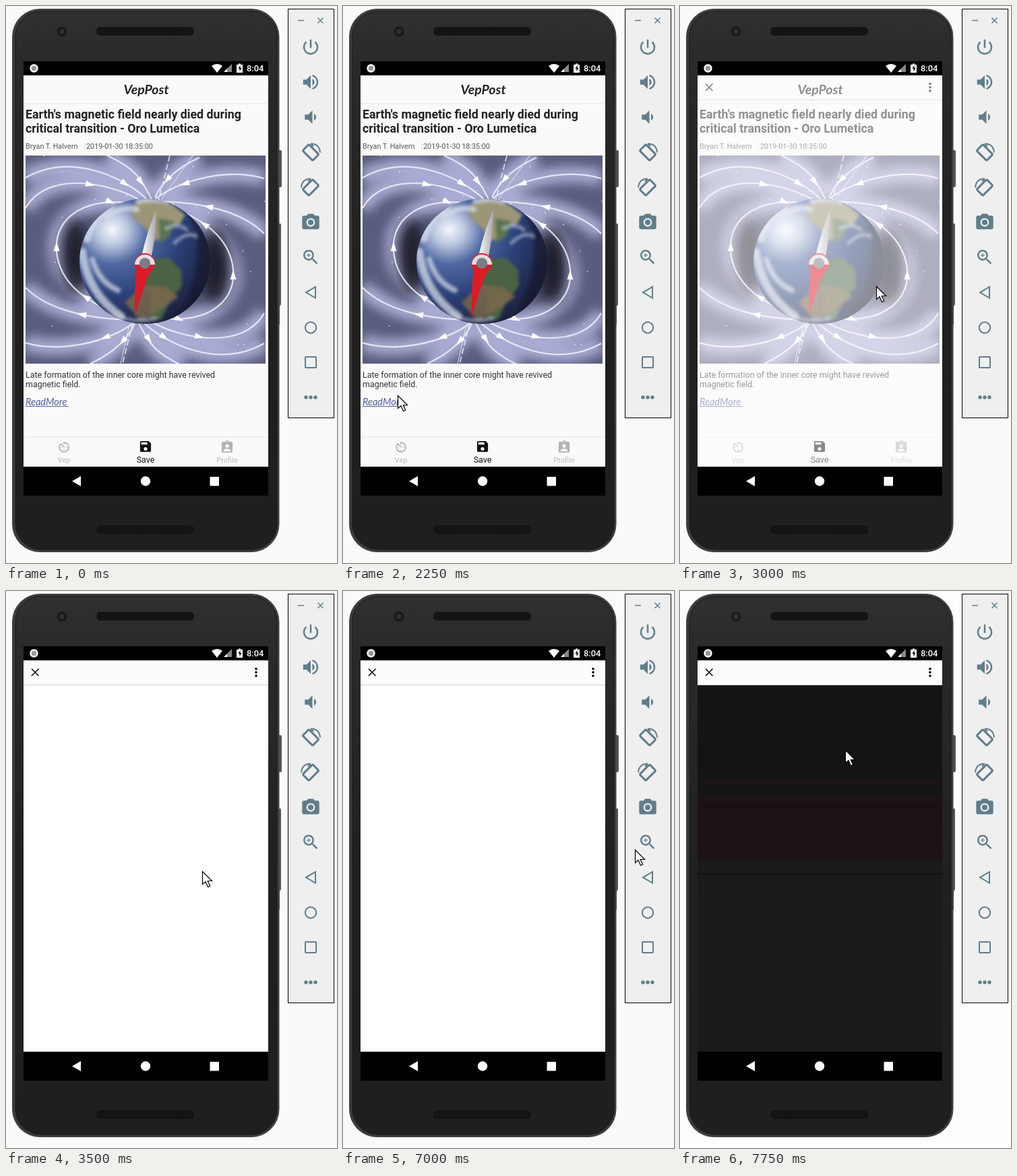
An HTML page for the animation above (8000 ms loop, 491x827 px).

```html
<!DOCTYPE html>
<html lang="en">
<head>
<meta charset="utf-8">
<title>News reader in a phone emulator</title>
<style>
  html, body { margin: 0; width: 100%; height: 100%; overflow: hidden; background: #fafafa; }
  svg { display: block; width: 491px; height: 827px; font-family: Roboto, sans-serif; }
  .script { font-family: Lato, sans-serif; font-style: italic; }
  .mid { text-anchor: middle; }
</style>
</head>
<body>
<svg viewBox="0 0 491 827">
  <defs>
    <linearGradient id="face" x2="0" y2="1">
      <stop stop-color="#303030"/><stop offset=".1" stop-color="#2a2a2a"/>
      <stop offset=".5" stop-color="#202020"/><stop offset="1" stop-color="#1f1f1f"/>
    </linearGradient>
    <radialGradient id="ocean" cx=".25" cy=".25" r=".85">
      <stop stop-color="#f4f7fc"/><stop offset=".14" stop-color="#bcc7e0"/>
      <stop offset=".32" stop-color="#5068a2"/><stop offset=".62" stop-color="#2b4078"/>
      <stop offset="1" stop-color="#1a1f38"/>
    </radialGradient>
    <linearGradient id="steel"><stop stop-color="#fff"/><stop offset="1" stop-color="#a5a5ab"/></linearGradient>
    <pattern id="mesh" width="4" height="4" patternUnits="userSpaceOnUse">
      <rect width="4" height="4" fill="#1c1c1c"/><path d="M0 0h2v2h-2zM2 2h2v2h-2z" fill="#0c0c0c"/>
    </pattern>
    <filter id="blur" x="-50%" y="-50%" width="200%" height="200%"><feGaussianBlur stdDeviation="11"/></filter>
    <filter id="glow"><feGaussianBlur stdDeviation="8"/></filter>
    <filter id="soft"><feGaussianBlur stdDeviation="2.2"/></filter>
    <clipPath id="photo"><path d="M29 222h356v309H29z"/></clipPath>
    <clipPath id="globe"><ellipse cx="206" cy="379" rx="97" ry="93"/></clipPath>
  </defs>

  <rect id="backdrop" width="491" height="827" fill="#fafafa"/>

  <!-- phone body -->
  <path d="M403 214h4q2 0 2 2v51q0 2-2 2h-4zM403 323h4q1 0 1 2v118l-2 3v27h-3z" fill="#555"/>
  <rect x="9.5" y="4.5" width="395.500" height="806" rx="41" fill="#3b3b3b" stroke="#454545"/>
  <rect x="14" y="8" width="388" height="799" rx="38" fill="url(#face)" stroke="#181818"/>
  <circle cx="83" cy="38" r="7.500" fill="#1b1b1b"/>
  <circle cx="83" cy="38" r="3.500" fill="#303034"/>
  <rect x="134" y="31" width="145" height="13" rx="6" fill="url(#mesh)"/>
  <rect x="134" y="771" width="145" height="13" rx="6" fill="url(#mesh)"/>
  <path d="M26 82h363v645H26z"/>

  <!-- status and navigation bars -->
  <g fill="#fff">
    <circle cx="41.500" cy="92.500" r="5" fill="#999" stroke="#fff" stroke-width="2.400"/>
    <path d="M305 89q8-6 16 0l-8 10z"/>
    <path d="M335 86v12h-7v-5z" fill="#888"/><path d="M328 93v5h-5z"/>
    <path d="M342 87h3v-1.500h3v1.500h3v12h-9z"/>
    <path d="M347.500 88l-3 5h2v4l3-5h-2z" fill="#000"/>
    <text x="357" y="97" font-size="12.900" font-weight="500">8:04</text>
    <path d="M98 705.500l13-7.500v15z"/><circle cx="207" cy="705.500" r="7.200"/>
    <rect x="302.500" y="699" width="13.500" height="13.500" rx="1"/>
  </g>

  <!-- article -->
  <g id="article">
    <path d="M26 103h363v581H26z" fill="#fafafa"/>
    <path d="M26 145h363M26 640h363" stroke="#e4e4e4"/>
    <text class="script mid" x="208" y="131" font-size="19.500" font-weight="700" fill="#222">VepPost</text>
    <g font-size="17.800" font-weight="700" fill="#222">
      <text x="29" y="167">Earth's magnetic field nearly died during</text>
      <text x="29" y="188">critical transition - Oro Lumetica</text>
    </g>
    <g font-size="10.800" fill="#555">
      <text x="29" y="212">Bryan T. Halvern</text>
      <path d="M116.500 203v10" stroke="#ddd"/>
      <text x="119" y="212">2019-01-30 18:35:00</text>
    </g>

    <g clip-path="url(#photo)">
      <path d="M29 222h356v309H29z" fill="#5a5c7e"/>
      <g fill="none" stroke="#a9abd2" stroke-width="24" filter="url(#glow)">
        <use href="#field"/><use href="#field" transform="rotate(180 206 378)"/>
      </g>
      <g fill="#1c1c2b" filter="url(#blur)">
        <ellipse cx="103" cy="372" rx="20" ry="58"/><ellipse cx="310" cy="386" rx="22" ry="58"/>
      </g>
      <g id="stars"></g>
      <g fill="none" stroke="#eceef8" stroke-width="2.200" opacity=".9">
        <path id="field" d="M195 295C125 280 70 310 75 365C80 415 125 445 185 463M200 289C150 260 60 245 29 300M210 288C180 258 100 215 29 255M216 287C200 255 190 240 150 222M29 418C60 450 120 465 188 466M29 500C80 515 150 500 190 470M125 531C160 515 180 495 191 472"/>
        <use href="#field" transform="rotate(180 206 378)"/>
        <path d="M243 222L226 290M188 470L173 531" stroke-dasharray="9 4" stroke-width="1.600"/>
        <path d="M277 222L230 288M184 470L170 531" stroke-width="1"/>
      </g>
      <g id="arrows" fill="#fff"></g>
      <ellipse cx="206" cy="379" rx="97" ry="93" fill="url(#ocean)"/>
      <g clip-path="url(#globe)"><g filter="url(#soft)">
        <path d="M186 296l22-9 38 7 20 16-8 14-19 2-8 18-14 6-10-20-18-14z" fill="#9b9677"/>
        <path d="M226 315l24 5-8 22-14 10z" fill="#5c7352"/>
        <path d="M218 376l24-2 18 18 1 24-18 22-13 28-17-4 2-34-14-22z" fill="#4b6245"/>
        <path d="M176 440l28-26 34 4 18 14-26 18-30 18z" fill="#7d6a4c" opacity=".8"/>
        <g fill="none" stroke="#dfe4ef" stroke-linecap="round">
          <path d="M113 365q8 62 58 96M120 345q6-30 34-48" stroke-width="12" opacity=".7"/>
          <path d="M128 376q10 34 38 46M150 312q22-16 44-10M196 290q20-6 42 0" stroke-width="8" opacity=".65"/>
          <path d="M250 352q18-18 32-10M160 458q30 14 62 6M238 330q18-8 30 2" stroke-width="5" opacity=".5"/>
        </g>
        <path d="M268 300q38 70-14 165h60v-170z" fill="#14182b" opacity=".55"/>
      </g></g>
      <path d="M223 302Q206 345 201 373L215 375Q222 345 223 302Z" fill="url(#steel)"/>
      <path d="M191 462Q190 420 194 388L216 390Q202 420 191 462Z" fill="#dc1b26"/>
      <g fill="none" stroke-width="7">
        <circle cx="206" cy="382" r="11.500" stroke="#dc1b26"/>
        <path d="M194.500 384a11.500 11.500 0 0 1 23 0" stroke="#dedee2"/>
      </g>
      <circle cx="206" cy="382" r="8" fill="#7a7d84"/>
    </g>

    <g font-size="12.450" fill="#333">
      <text x="29" y="552">Late formation of the inner core might have revived</text>
      <text x="29" y="566">magnetic field.</text>
    </g>
    <text class="script" x="29" y="593" font-size="14.500" fill="#5361a3">ReadMore</text>
    <path d="M29 594.500h63.500" stroke="#5361a3"/>
    <g class="mid" font-size="11" fill="#bbb">
      <text x="86" y="678">Vep</text>
      <text x="207" y="678" font-size="12.500" fill="#111">Save</text>
      <text x="328" y="678">Profile</text>
    </g>
    <g id="tabs"></g>
  </g>

  <!-- in-app browser -->
  <g id="browser">
    <path id="page" d="M26 103h363v581H26z" fill="#fff"/>
    <g id="dark">
      <path d="M26 140h363v544H26z" fill="#1b1a1b"/>
      <path d="M26 140h363v140H26z" fill="#141414"/>
      <path d="M26 280h363v121H26z" fill="#1c1414"/>
      <path d="M26 286h363v16H26z" fill="#151313"/>
      <path d="M26 321h363M26 420h363" stroke="#171112" stroke-width="2"/>
    </g>
    <path d="M26 103h363v36H26z" fill="#fcfcfc"/>
    <path d="M26 139.500h363" stroke="#cfcfcf"/>
    <path d="M38 115.500l10.500 10.500M48.500 115.500L38 126" stroke="#111" stroke-width="1.700"/>
    <circle cx="371" cy="115.500" r="1.800"/><circle cx="371" cy="120.800" r="1.800"/><circle cx="371" cy="126" r="1.800"/>
    <circle id="spinner" cx="206.500" cy="393" r="15.500" fill="none" stroke="#ddd" stroke-width="3"/>
  </g>

  <!-- emulator toolbar -->
  <rect x="418.500" y="4.500" width="68" height="607" fill="#efefef" stroke="#000"/>
  <g id="tools"></g>
  <g fill="none" stroke="#607d8b" stroke-width="2">
    <path d="M433 21.500h9M462.500 17.500l8 8M470.500 17.500l-8 8" stroke-width="1.500"/>
    <g id="turn">
      <rect x="445.500" y="207" width="13" height="21" rx="2" transform="rotate(-45 452 217.500)" stroke-width="3"/>
      <path d="M452 204.500q13 0 14 13M452 204.500l4 4"/>
    </g>
    <use href="#turn" transform="matrix(-1 0 0 1 904 52)"/>
    <path d="M459 417v16.500l-14-8.200z"/><circle cx="452" cy="477.500" r="8.200"/>
    <rect x="444" y="521" width="16" height="16" rx="1"/>
  </g>
  <g fill="#607d8b"><circle cx="445" cy="581" r="2.700"/><circle cx="452" cy="581" r="2.700"/><circle cx="459" cy="581" r="2.700"/></g>

  <path id="cursor" d="M.5.500v19l4.500-4 3.500 8 3.200-1.500-3.500-7.500h6.300z" fill="#fff" stroke="#000" stroke-width="1.200"/>
</svg>

<script>
const $ = id => document.getElementById(id);

// Icons live on a 24-unit grid, centred on (x, y).
const icon = (x, y, scale, color, d) =>
  `<path transform="translate(${x} ${y}) scale(${scale}) translate(-12 -12)" fill="${color}" d="${d}"/>`;

const slate = '#607d8b';
$('tools').innerHTML =
  icon(452, 61, 1.25, slate, 'M13 3h-2v10h2V3zm4.83 2.17l-1.42 1.42C17.99 7.86 19 9.81 19 12c0 3.87-3.13 7-7 7s-7-3.13-7-7c0-2.19 1.01-4.14 2.58-5.42L6.17 5.17C4.23 6.82 3 9.26 3 12c0 4.97 4.03 9 9 9s9-4.03 9-9c0-2.74-1.23-5.18-3.17-6.83z') +
  icon(452, 113, 1.25, slate, 'M3 9v6h4l5 5V4L7 9H3zm13.5 3c0-1.77-1.02-3.29-2.5-4.03v8.05c1.48-.73 2.5-2.25 2.5-4.02zM14 3.23v2.06c2.89.86 5 3.54 5 6.71s-2.11 5.85-5 6.71v2.06c4.01-.91 7-4.49 7-8.77s-2.99-7.86-7-8.77z') +
  icon(452, 165, 1.25, slate, 'M18.5 12c0-1.77-1.02-3.29-2.5-4.03v8.05c1.48-.73 2.5-2.25 2.5-4.02zM5 9v6h4l5 5V4L9 9H5z') +
  icon(452, 321.3, 1.27, slate, 'M15.2 12a3.2 3.2 0 1 1-6.4 0a3.2 3.2 0 1 1 6.4 0zM9 2L7.17 4H4c-1.1 0-2 .9-2 2v12c0 1.1.9 2 2 2h16c1.1 0 2-.9 2-2V6c0-1.1-.9-2-2-2h-3.17L15 2H9zm3 15c-2.76 0-5-2.24-5-5s2.24-5 5-5 5 2.24 5 5-2.24 5-5 5z') +
  icon(452, 373, 1.22, slate, 'M15.5 14h-.79l-.28-.27C15.41 12.59 16 11.11 16 9.5 16 5.91 13.09 3 9.5 3S3 5.91 3 9.5 5.91 16 9.5 16c1.61 0 3.09-.59 4.23-1.57l.27.28v.79l5 4.99L20.49 19l-4.99-5zm-6 0C7.01 14 5 11.99 5 9.5S7.01 5 9.5 5 14 7.01 14 9.5 11.99 14 9.5 14zM12 10h-2v2H9v-2H7V9h2V7h1v2h2v1z');

$('tabs').innerHTML =
  icon(86, 655, .87, '#b3b3b3', 'M11 17a1 1 0 0 0 2 0a1 1 0 0 0-2 0zm0-14v4h2V5.08c3.39.49 6 3.39 6 6.92 0 3.87-3.13 7-7 7s-7-3.13-7-7c0-1.68.59-3.22 1.58-4.42L12 13l1.41-1.41-6.8-6.8C4.42 6.45 3 9.05 3 12c0 4.97 4.02 9 9 9 4.97 0 9-4.03 9-9s-4.03-9-9-9h-1zm7 9a1 1 0 0 0-2 0a1 1 0 0 0 2 0zM6 12a1 1 0 0 0 2 0a1 1 0 0 0-2 0z') +
  icon(207, 654, .9, '#111', 'M17 3H5c-1.11 0-2 .9-2 2v14c0 1.1.89 2 2 2h14c1.1 0 2-.9 2-2V7l-4-4zm-5 16c-1.66 0-3-1.34-3-3s1.34-3 3-3 3 1.34 3 3-1.34 3-3 3zm3-10H5V5h10v4z') +
  icon(328, 655, .9, '#b3b3b3', 'M19 3h-4.18C14.4 1.84 13.3 1 12 1c-1.3 0-2.4.84-2.82 2H5c-1.1 0-2 .9-2 2v14c0 1.1.9 2 2 2h14c1.1 0 2-.9 2-2V5c0-1.1-.9-2-2-2zm-7 0c.55 0 1 .45 1 1s-.45 1-1 1-1-.45-1-1 .45-1 1-1zm0 4c1.66 0 3 1.34 3 3s-1.34 3-3 3-3-1.34-3-3 1.34-3 3-3zm6 12H6v-1.4c0-2 4-3.1 6-3.1s6 1.1 6 3.1V19z');

// A dipole field points the same way at opposite points, so each arrow has a twin.
const arrow = (x, y, angle) =>
  `<path d="M7 0L-7-4.500V4.500z" transform="translate(${x} ${y}) rotate(${angle})"/>`;
$('arrows').innerHTML = [
  [125, 265, 14], [155, 291, 24], [177, 264, 35], [200, 261, 55], [75, 357, -90],
  [118, 432, 214], [112, 458, 190], [147, 492, 160], [173, 498, 130]
].map(([x, y, a]) => arrow(x, y, a) + arrow(412 - x, 756 - y, a)).join('');

let seed = 7;
const random = () => (seed = seed * 16807 % 2147483647) / 2147483647;
$('stars').innerHTML = Array.from({ length: 55 }, (_, i) =>
  `<circle cx="${29 + random() * 356}" cy="${222 + random() * 309}" r=".8" fill="${i % 3 ? '#fff' : '#d66'}"/>`).join('');

// The pointer jumps: [ms, x, y].
const stops = [
  [250, 208, 647], [500, 201, 633], [750, 135, 615], [1000, 65, 580], [1250, 55, 592],
  [1500, 76, 582], [1750, 64, 592], [2250, 81, 578], [2500, 111, 567], [2750, 257, 415],
  [3000, 291, 416], [6000, 413, 527], [6750, 390, 509], [7000, 433, 384],
  [7250, 423, 368], [7500, 272, 253], [7750, 245, 236]
];
const show = (id, on) => $(id).setAttribute('visibility', on ? 'inherit' : 'hidden');

function draw(t) {
  const stop = stops.filter(s => s[0] <= t).pop();
  show('cursor', stop);
  if (stop) $('cursor').setAttribute('transform', `translate(${stop[1]} ${stop[2]})`);
  show('browser', t >= 3000);
  $('browser').setAttribute('opacity', t < 3250 ? .5 : 1);
  show('spinner', t >= 3250 && t < 3500);
  show('dark', t >= 7750);
  $('page').setAttribute('fill', t < 7500 ? '#fff' : '#fcfcfc');
  $('backdrop').setAttribute('fill', t < 7500 ? '#fafafa' : '#fdfdfd');
}

const start = performance.now();
function tick() {
  draw((performance.now() - start) % 8000);
  requestAnimationFrame(tick);
}
tick();
</script>
</body>
</html>
```
